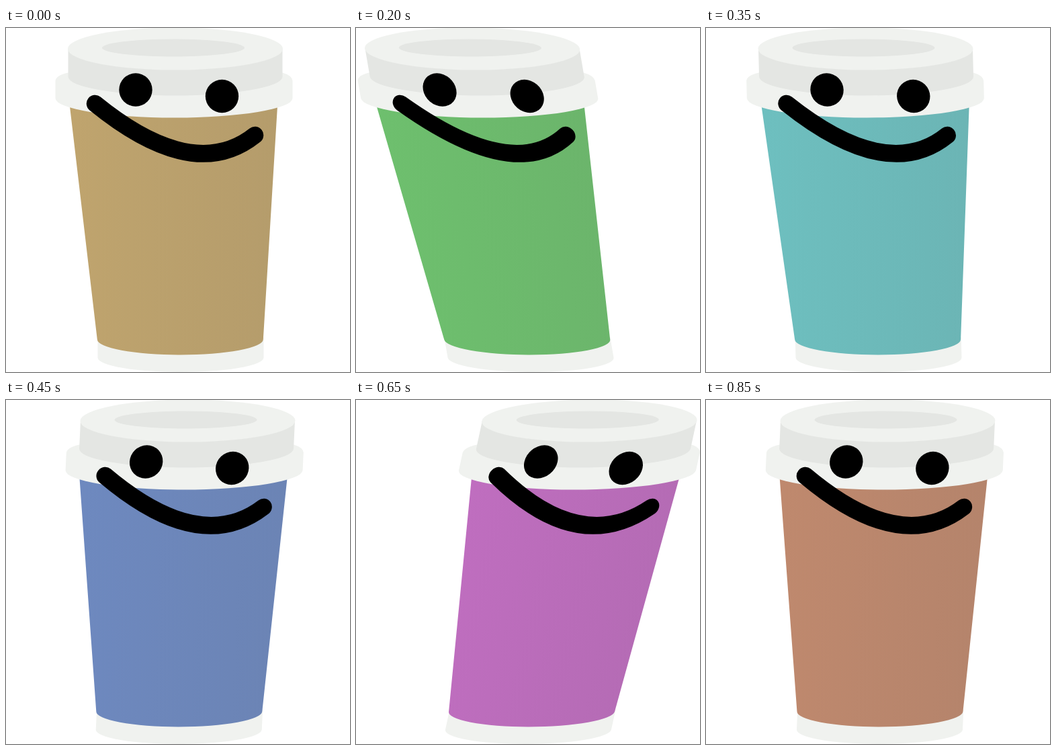
Animation, 512 px wide and 512 px high, one loop 0.9 s. Source, as an HTML page:

```html
<!DOCTYPE html>
<html lang="en">
<head>
<meta charset="utf-8">
<title>Swaying cup</title>
<style>
  html, body { margin: 0; width: 100%; height: 100%; overflow: hidden; background: #fff; }
  svg { display: block; width: 100%; height: 100%; }
</style>
</head>
<body>
<svg viewBox="0 0 512 512">
  <defs>
    <linearGradient id="sleeve">
      <stop id="light"/>
      <stop id="dark" offset="1"/>
    </linearGradient>
  </defs>
  <g id="cup" fill="#f0f2ef">
    <path d="M136 460V490A123.500 21.500 0 0 0 383 490V460Z"/>
    <path fill="url(#sleeve)" d="M93.500 108L135.300 463A123.500 23 0 0 0 382.300 463L404 108Z"/>
    <path d="M73 78Q74 70 92 66H411Q425 70 426 78V104A176.500 29 0 0 1 73 104Z"/>
    <path fill="#e4e6e3" d="M92 30V72A159.500 28 0 0 0 411 72V30Z"/>
    <ellipse cx="251.500" cy="30.500" rx="160" ry="31.500"/>
    <ellipse cx="248.500" cy="29" rx="106" ry="13" fill="#e4e6e3"/>
    <g fill="#000">
      <circle cx="192.500" cy="91.500" r="24.700"/>
      <circle cx="321" cy="101" r="24.700"/>
    </g>
    <path fill="none" stroke="#000" stroke-width="25.500" stroke-linecap="round" d="M132 112Q279 231.500 370 159"/>
  </g>
</svg>
<script>
const LOOP = 900, STEP = 50, TOP_Y = 30, BASE_Y = 490;

// Time in ms, sideways shift of the lid, sideways shift of the base
const sway = [
  [0, 0, 0], [100, -34, 0], [200, -79, 0], [300, -35, -2], [350, -14.5, -3],
  [550, 51.5, -2.5], [650, 95.5, -3.5], [750, 51.5, -2.5], [850, 18.5, -1.5], [900, 0, 0]
];
const byId = id => document.getElementById(id);
const cup = byId('cup'), light = byId('light'), dark = byId('dark');

function shiftsAt(time) {
  const i = sway.findIndex(key => key[0] > time);
  const from = sway[i - 1], to = sway[i];
  const p = (time - from[0]) / (to[0] - from[0]);
  return [1, 2].map(n => from[n] + (to[n] - from[n]) * p);
}

function draw() {
  const time = Math.floor(performance.now() % LOOP / STEP) * STEP;
  const [top, base] = shiftsAt(time);
  const shear = (top - base) / (TOP_Y - BASE_Y);
  cup.setAttribute('transform', `matrix(1 0 ${shear} 1 ${base - shear * BASE_Y + 0.5} 0.5)`);

  const hue = (40 + 360 * time / LOOP) % 360;
  light.setAttribute('stop-color', `hsl(${hue}, 39%, 59%)`);
  dark.setAttribute('stop-color', `hsl(${hue}, 33%, 56.5%)`);
  requestAnimationFrame(draw);
}
draw();
</script>
</body>
</html>
```
